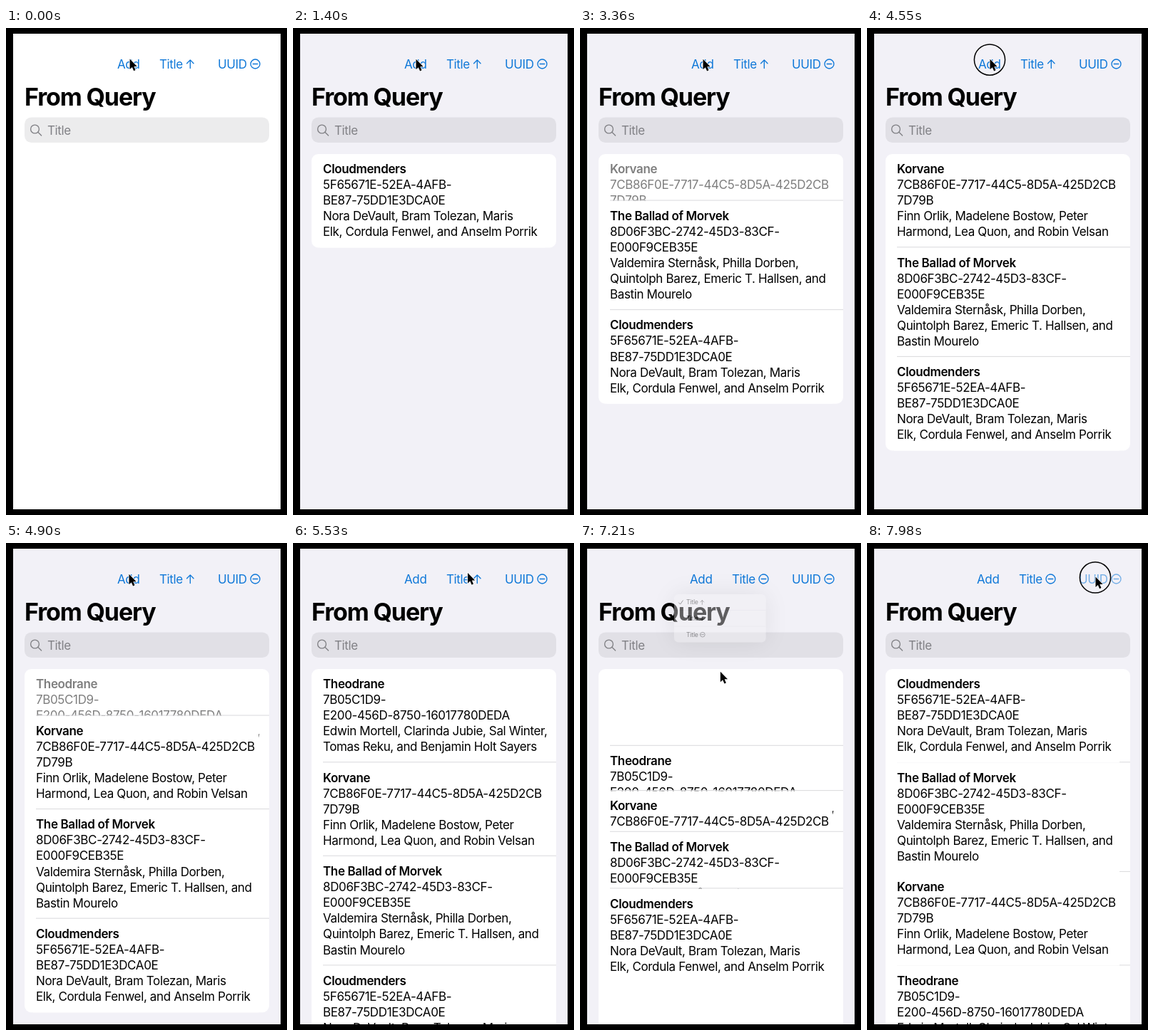
An HTML page that plays this animation: 394 by 684 pixels, repeating every 8000 ms.

```html
<!DOCTYPE html>
<html lang="en">
<head>
<meta charset="utf-8">
<title>From Query</title>
<style>
  html, body { margin: 0; width: 100%; height: 100%; overflow: hidden; background: #000; }
  svg { display: block; }
  text { font: 400 17px Inter, sans-serif; font-optical-sizing: none; letter-spacing: -.37px; white-space: pre; }
  .headline { font-weight: 600; }
  .heading { font-weight: 700; font-size: 34px; letter-spacing: -1.13px; }
  .icon { fill: none; stroke: currentColor; stroke-width: 1.35; stroke-linecap: round; stroke-linejoin: round; }
  .label text { fill: currentColor; }
  .bar { color: #0f78d8; }
  #panel { filter: drop-shadow(0 0 34px rgba(0, 0, 0, .2)); }
</style>
</head>
<body>
<svg id="stage" width="394" height="684" viewBox="0 0 394 684"></svg>
<script>
const LOOP = 8000, STEP = 70;
const TOP = 177, LINE = 22.1, PAD = 21;

// Listed from the bottom layer to the top one.
const movies = {
  theodrane: ['Theodrane', '7B05C1D9-', 'E200-456D-8750-16017780DEDA',
    'Edwin Mortell, Clarinda Jubie, Sal Winter,', 'Tomas Reku, and Benjamin Holt Sayers'],
  korvane: ['Korvane', '7CB86F0E-7717-44C5-8D5A-425D2CB', '7D79B',
    'Finn Orlik, Madelene Bostow, Peter', 'Harmond, Lea Quon, and Robin Velsan'],
  ballad: ['The Ballad of Morvek', '8D06F3BC-2742-45D3-83CF-', 'E000F9CEB35E',
    'Valdemira Sternåsk, Philla Dorben,', 'Quintolph Barez, Emeric T. Hallsen, and', 'Bastin Mourelo'],
  cloudmenders: ['Cloudmenders', '5F65671E-52EA-4AFB-', 'BE87-75DD1E3DCA0E',
    'Nora DeVault, Bram Tolezan, Maris', 'Elk, Cordula Fenwel, and Anselm Porrik'],
};

// When each list order starts to animate in.
const lists = [
  [-1000, []],
  [910, ['cloudmenders']],
  [1960, ['ballad', 'cloudmenders']],
  [3150, ['korvane', 'ballad', 'cloudmenders']],
  [4690, ['theodrane', 'korvane', 'ballad', 'cloudmenders']],
  [7070, ['cloudmenders', 'ballad', 'korvane', 'theodrane']],
];

// Pointer: time, x, y.
const pointer = [
  [0, 173.6, 43.5], [69, 173.6, 43.5], [70, 172.5, 43.7], [4900, 172.5, 43.7],
  [5460, 250, 43], [5530, 245, 42], [5670, 230, 44.5], [6150, 230, 44.5],
  [6510, 219.7, 131.5], [6650, 196, 179.5], [6790, 193, 185], [7150, 193, 185],
  [7700, 309, 59], [7840, 320.5, 47.5],
];
const presses = [[700, 910], [1820, 1960], [3010, 3150], [4550, 4690], [5880, 6020], [6930, 7070], [7910, 8000]];

const clamp = x => Math.min(1, Math.max(0, x));
const lerp = (a, b, p) => a + (b - a) * p;
const smooth = x => (x = clamp(x), x * x * (3 - 2 * x));
const progress = (t, start, length) => smooth((t - start) / length);
const within = (t, start, end) => t >= start && t < end;

const text = (x, y, words, cls = '') => `<text x="${x}" y="${y}" class="${cls}">${words}</text>`;
const iconPaths = {
  up: 'M0 6V-5.5M-4.7-.8 0-5.6 4.7-.8',
  down: 'M0-6V5.5M-4.7 .8 0 5.6 4.7 .8',
  none: 'M-3.3 0H3.3M-6.5 0a6.5 6.5 0 1 0 13 0a6.5 6.5 0 1 0-13 0',
};
const icon = (kind, x, y) => `<path class="icon" transform="translate(${x} ${y})" d="${iconPaths[kind]}"/>`;
const label = (x, y, words, kind, iconX, id = '') =>
  `<g class="label" id="${id}">${text(x, y + 6, words)}${icon(kind, iconX, y)}</g>`;

const rowHeight = name => movies[name].length * LINE + PAD;
const row = name => `<g id="${name}">
  <rect x="38" width="316" height="${rowHeight(name)}" fill="#fff"/>
  <path class="rule" d="M42-.7H369" stroke="#d9d9dc"/>
  ${movies[name].map((line, i) => text(42, 27 + i * LINE, line, i ? '' : 'headline')).join('')}
</g>`;

document.getElementById('stage').innerHTML = `
  <clipPath id="window"><rect x="10" y="8" width="375" height="668"/></clipPath>
  <g clip-path="url(#window)">
    <rect width="394" height="684" fill="#fff"/>
    <rect id="grouped" width="394" height="684" fill="#f2f1f7"/>
    <g class="bar">
      <g id="add" class="label">${text(0, 56.5, 'Add')}</g>
      ${label(215, 50.5, 'Title', 'up', 258.3, 'ascending')}
      ${label(213, 50.5, 'Title', 'none', 257.5, 'unsorted')}
      ${label(297, 50.5, 'UUID', 'none', 349.5, 'uuid')}
    </g>
    ${text(26, 108.5, 'From Query', 'heading')}
    <rect x="26" y="125.5" width="343" height="35.5" rx="9.5" fill="rgba(118,118,128,.14)"/>
    <g color="#808085">
      <path class="icon" d="M34.6 142a5.9 5.9 0 1 0 11.8 0a5.9 5.9 0 1 0-11.8 0M44.8 146.3 49.6 151"/>
      <g class="label">${text(58, 149.7, 'Title')}</g>
    </g>
    <g id="list">
      <rect id="card" x="26" y="${TOP}" width="343" rx="9.5" fill="#fff"/>
      ${Object.keys(movies).map(row).join('')}
    </g>
    <g id="menu">
      <rect id="panel" x="31" y="74" width="250" height="131" rx="12" fill="#f1f0f4"/>
      <path d="M31 117.5H281M31 161.5H281" stroke="#d2d1d6"/>
      <path class="icon" style="stroke-width:1.8" d="M44 97 47.8 101.2 55 91"/>
      ${label(64, 96, 'Title', 'up', 107.5)}
      ${label(64, 140, 'Title', 'down', 107.5)}
      ${label(64, 184, 'Title', 'none', 108.5)}
    </g>
    <g id="pointer">
      <circle id="ring" cx="-.5" cy=".9" r="21.6" fill="none" stroke="#000" stroke-width="1.5"/>
      <path d="M0 0V14.5L3.3 11.5 5.6 16.7 8 15.6 5.8 10.5H10.2Z" stroke="#fff" stroke-width="1.4" paint-order="stroke"/>
    </g>
  </g>`;

const set = (id, attributes) => {
  const node = document.getElementById(id);
  for (const name in attributes) node.setAttribute(name, attributes[name]);
};

function layout(order) {
  const tops = {};
  let bottom = TOP;
  for (const name of order) {
    tops[name] = bottom;
    bottom += rowHeight(name);
  }
  return { tops, bottom };
}

function drawList(t) {
  const current = lists.findLastIndex(([start]) => t >= start);
  const [start, order] = lists[current];
  const p = progress(t, start, 420);
  const after = layout(order);
  const before = layout(current > 1 ? lists[current - 1][1] : order);
  const shown = progress(t, 910, 420);

  set('grouped', { opacity: shown });
  set('list', { opacity: shown });
  set('card', { height: lerp(before.bottom, after.bottom, p) - TOP });
  for (const name in movies) {
    const isNew = !(name in before.tops);
    const end = after.tops[name] ?? TOP;
    const y = isNew ? end : lerp(before.tops[name], end, p);
    set(name, {
      transform: `translate(0 ${y})`,
      opacity: name in after.tops ? (isNew ? p : 1) : 0,
    });
    document.querySelector(`#${name} .rule`).setAttribute('opacity', clamp((y - TOP) / 10));
  }
}

function drawBar(t) {
  const picked = t >= 7210;
  set('add', { transform: `translate(${picked ? 154 : 156} 0)`, opacity: within(t, 770, 910) ? .5 : 1 });
  set('ascending', { opacity: picked ? 0 : t >= 5950 ? .55 : 1 });
  set('unsorted', { opacity: picked ? 1 : 0 });
  set('uuid', { opacity: t >= 7980 ? .55 : 1 });
}

function drawMenu(t) {
  const open = progress(t, 5980, 350) * (1 - progress(t, 7050, 280));
  const scale = lerp(.2, 1, open);
  set('menu', {
    opacity: open,
    transform: `translate(239 70) scale(${scale}) translate(-239 -70)`,
  });
}

function drawPointer(t) {
  const next = pointer.findIndex(([time]) => time > t);
  const to = pointer.at(next), from = next < 0 ? to : pointer[next - 1];
  const p = next < 0 ? 1 : smooth((t - from[0]) / (to[0] - from[0]));
  set('pointer', { transform: `translate(${lerp(from[1], to[1], p)} ${lerp(from[2], to[2], p)})` });
  set('ring', { opacity: presses.some(([start, end]) => within(t, start, end)) ? 1 : 0 });
}

function frame() {
  const t = Math.floor(performance.now() % LOOP / STEP) * STEP;
  drawList(t);
  drawBar(t);
  drawMenu(t);
  drawPointer(t);
  requestAnimationFrame(frame);
}
frame();
</script>
</body>
</html>
```
